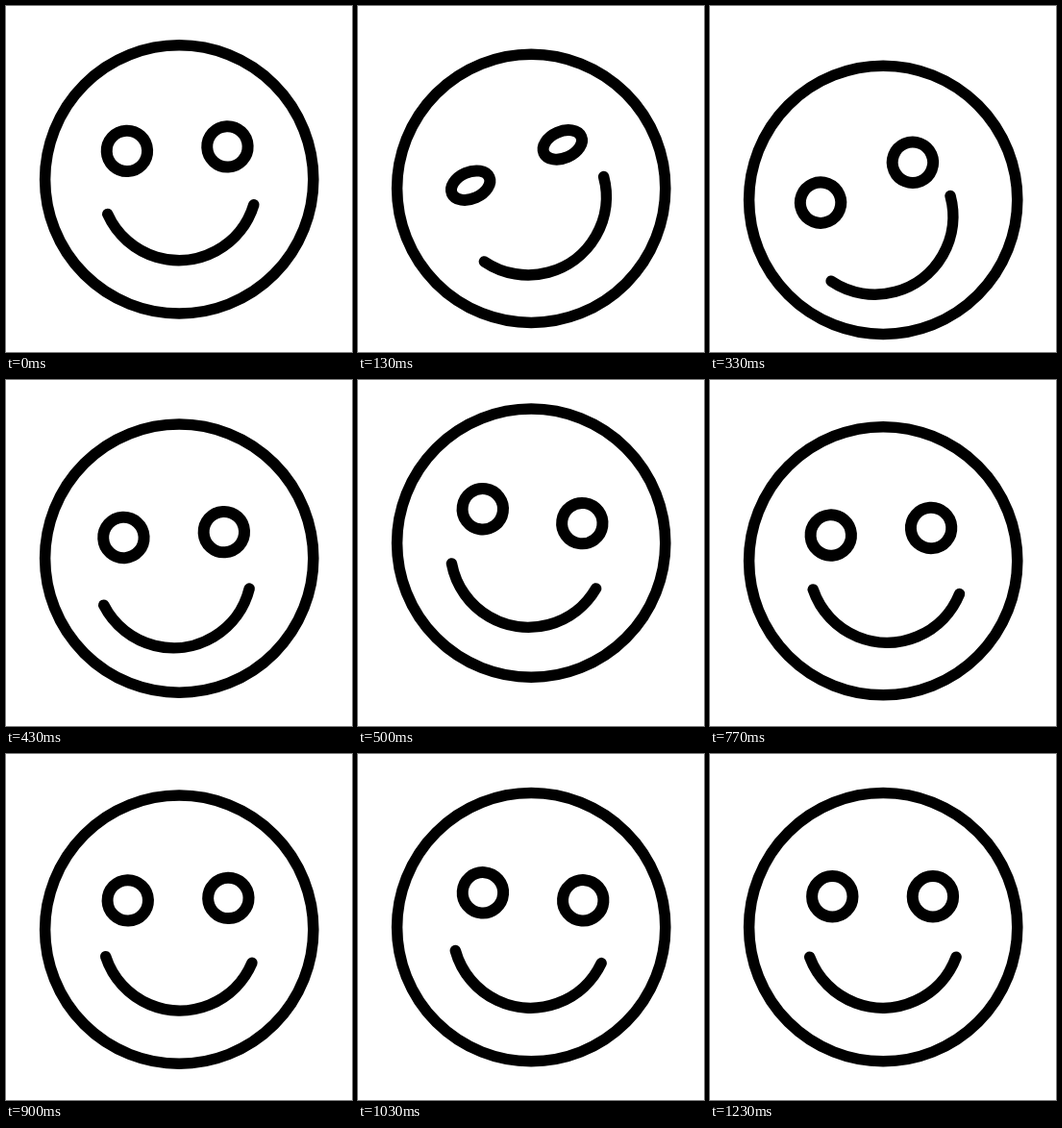
An HTML page with a canvas for the animation above (1670 ms loop, 360 by 360 pixels).

```html
<!DOCTYPE html>
<html lang="en">
<head>
<meta charset="utf-8">
<title>Nodding smiley</title>
<style>
  html, body { margin: 0; width: 100%; height: 100%; overflow: hidden; background: #fff; }
  canvas { display: block; width: 100%; height: 100%; }
</style>
</head>
<body>
<canvas id="stage" width="360" height="360"></canvas>
<script>
const ctx = document.getElementById('stage').getContext('2d');
const LOOP = 1670;
const STEP = 100 / 3;
const RAD = Math.PI / 180;
const CENTER = 180.2;

// Steps at which the bounce and the tilt turn around.
const BOUNCE = [-0.7, 9.5, 17.7, 23.5, 29];
const TILT = [-1.5, 7, 17, 24, 31, 37];

const clamp = u => Math.min(1, Math.max(0, u));
const easeSine = u => (1 - Math.cos(Math.PI * u)) / 2;

// Starts at 0, swings through the extremes and comes back to rest at 0.
function swing(turns, extremes, step) {
  let value = 0;
  [...extremes, 0].forEach((next, i) => {
    const u = clamp((step - turns[i]) / (turns[i + 1] - turns[i]));
    value += (next - (extremes[i - 1] || 0)) * easeSine(u);
  });
  return value;
}

const bounce = (step, ...extremes) => swing(BOUNCE, extremes, step);
const tilt = (step, ...extremes) => swing(TILT, extremes, step);

function eyeOpenness(step) {
  const u = clamp((step - 2) / 7);
  return 1 - 0.57 * Math.sin(Math.PI * u) ** 2;
}

function strokePath(width, trace) {
  ctx.lineWidth = width;
  ctx.beginPath();
  trace();
  ctx.stroke();
}

function placed(x, y, degrees, draw) {
  ctx.save();
  ctx.translate(x, y);
  ctx.rotate(degrees * RAD);
  draw();
  ctx.restore();
}

function drawEyes(open) {
  for (const x of [-52.3, 52.3]) {
    strokePath(12, () => ctx.ellipse(x, -32, 21.2, 21.2 * open, 0, 0, 2 * Math.PI));
  }
}

function drawMouth() {
  strokePath(11.5, () => ctx.arc(0, 2.7, 81.3, 20.4 * RAD, 159.6 * RAD));
}

function draw(step) {
  const headY = CENTER + bounce(step, 22, -21, 8.6);

  ctx.fillStyle = '#fff';
  ctx.fillRect(0, 0, 360, 360);
  ctx.strokeStyle = '#000';
  ctx.lineCap = 'round';

  strokePath(11.5, () => ctx.arc(CENTER, headY, 139.6, 0, 2 * Math.PI));

  // The features drag behind the head, the mouth more than the eyes.
  placed(179.6 + bounce(step, -3.8, -2.2, 0.7),
         headY + bounce(step, 11.3, 1.2, 1.4),
         tilt(step, -33, 12.5, -5, 4.4),
         () => drawEyes(eyeOpenness(step)));

  placed(179.9 + bounce(step, -10, 0.5, 4.5),
         headY + bounce(step, 15, 0, 1),
         tilt(step, -49, 16, 1, 4.9),
         drawMouth);
}

function tick() {
  const time = performance.now() % LOOP;
  // Steps begin on times rounded to 10 ms, up to 3.4 ms early.
  draw(Math.floor((time + 3.4) / STEP));
  requestAnimationFrame(tick);
}
tick();
</script>
</body>
</html>
```
